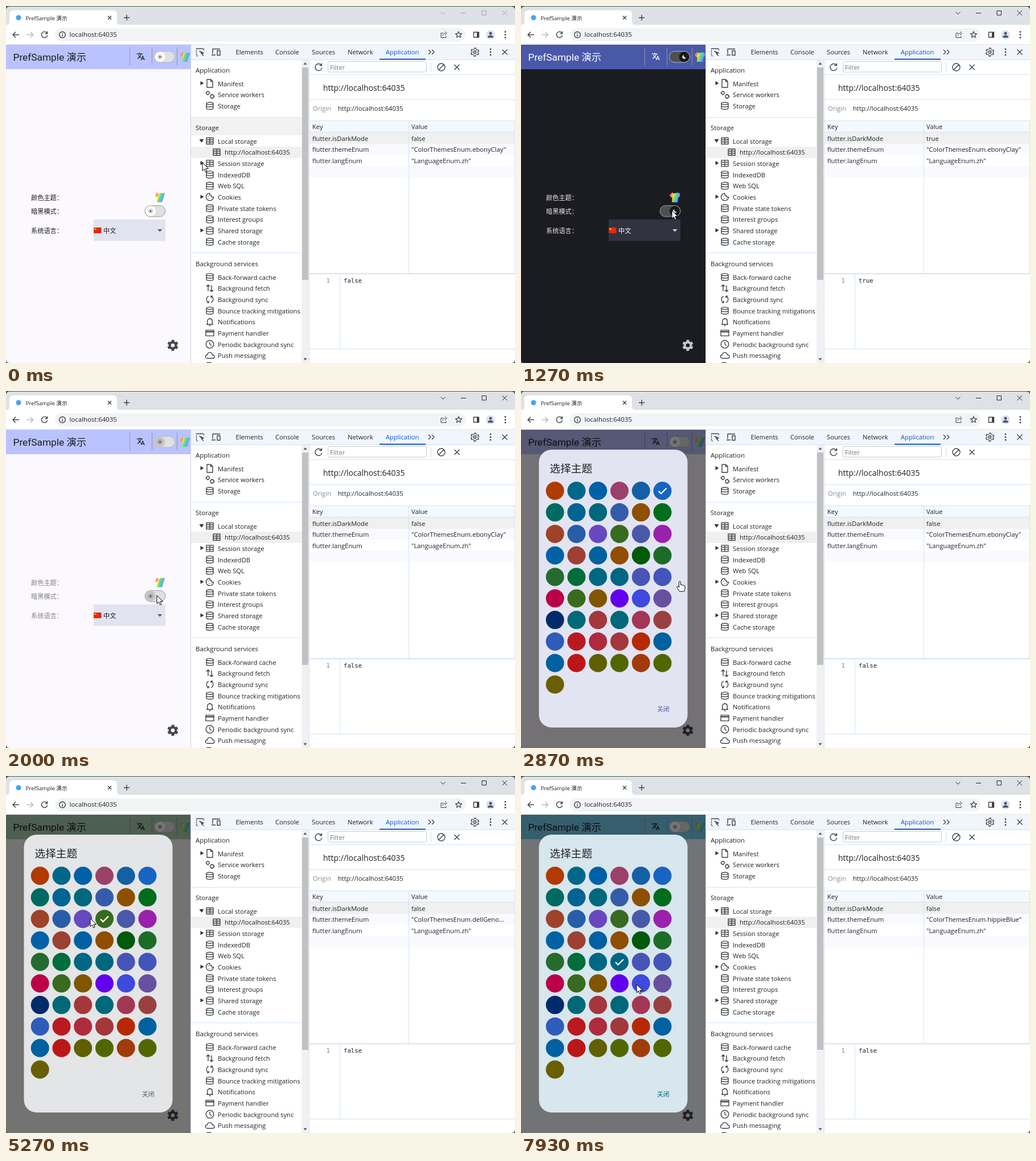
Animation, 894 px wide and 627 px high, one loop 8 s. Source, as an HTML page:

```html
<!DOCTYPE html>
<html lang="zh">
<head>
<meta charset="utf-8">
<title>PrefSample 演示</title>
<style>
html, body { margin: 0; width: 100%; height: 100%; overflow: hidden; background: #45604f; }
svg { display: block; width: 894px; height: 627px; }
text { font: 11.2px "Open Sans", "Noto Sans CJK SC", "Noto Sans CJK", sans-serif; fill: #202124; white-space: pre; }
.app text { font-family: Roboto, "Noto Sans CJK SC", "Noto Sans CJK", sans-serif; }
text.mono { font: 10.7px "DejaVu Sans Mono", monospace; }
.ico { fill: none; stroke: #3c4043; stroke-width: 1.4; stroke-linejoin: round; }
</style>
</head>
<body>
<svg id="stage" viewBox="0 0 894 627" xmlns="http://www.w3.org/2000/svg"></svg>
<script>
const LOOP = 8000;
const rect = (x, y, w, h, fill, more = '') =>
  `<rect x="${x}" y="${y}" width="${w}" height="${h}" fill="${fill}" ${more}/>`;
const text = (x, y, s, more = '') => `<text x="${x}" y="${y}" ${more}>${s}</text>`;
const size = (px, more = '') => `style="font-size:${px}px;${more}"`;
const icon = (x, y, d, more = '') => `<path class="ico" transform="translate(${x} ${y})" d="${d}" ${more}/>`;
const disc = (x, y, r, fill, more = '') => `<circle cx="${x}" cy="${y}" r="${r}" fill="${fill}" ${more}/>`;
const hline = (x, y, w, c = '#d3e3fd') => rect(x, y, w, 1, c);
const vline = (x, y, h, c = '#d3e3fd') => rect(x, y, 1, h, c);

const ring = r => `M${-r} 0a${r} ${r} 0 1 0 ${2 * r} 0a${r} ${r} 0 1 0 ${-2 * r} 0`;
const ICONS = {
  db: 'M-6 -4.2c0-2.6 12-2.6 12 0s-12 2.6-12 0V4.2c0 2.6 12 2.6 12 0V-4.2M-6 0c0 2.6 12 2.6 12 0',
  grid: 'M-6 -5.5H6V5.5H-6ZM-6 -2H6M-6 1.8H6M0 -5.5V5.5',
  file: 'M-5 -7H1.5L5 -3.5V7H-5ZM1.5 -7V-3.5H5',
  gears: 'M-6 -3a2.6 2.6 0 1 0 5.2 0a2.6 2.6 0 1 0-5.2 0M1 3a3 3 0 1 0 6 0a3 3 0 1 0-6 0M-3.4-7v1.4M-3.4-.4V1M-7.5-3h1.5M4-1.5V0M4 6v1.5M7 3h1.5',
  cookie: 'M0 -6.5A6.5 6.5 0 1 0 6.5 0C4 1 2.5-.5 3-2.5C.5-2-.8-4 0-6.5M-3-1.5h1.2M-2 3h1.2M2 2.5h1.2',
  updown: 'M-3 5V-6M-6 -3L-3 -6L0 -3M3 -5V6M0 3L3 6L6 3',
  sync: 'M-2 -5.5C-7 -4-7 4-2 5.5M-5 5.8H-2V2.5M2 5.5C7 4 7-4 2-5.5M5-5.8H2V-2.5',
  bell: 'M-6 4.5H6M-4.3 4.5V-1C-4.3-7 4.3-7 4.3-1V4.5M-1.5 6.8H1.5M0-7V-5',
  card: 'M-7 -5H7V5H-7ZM-7 -1.8H7M-7-2.6H7',
  clock: ring(6.8) + 'M0 -4V0L3 2.5',
  cloud: 'M-4 5C-9 5-8.5-1-4.5-1C-4-6.5 4-6.5 4.5-1C9.5-1 9 5 5 5Z'
};

// Six teeth come from one dashed circle.
function gear(x, y, s, color, id = '') {
  return `<g ${id} transform="translate(${x} ${y}) scale(${s})" fill="none" stroke="${color}">
    <circle r="5.2" stroke-width="4"/>
    <circle r="7.8" stroke-width="3" pathLength="12" stroke-dasharray="1.1 .9" transform="rotate(13.5)"/></g>`;
}

function sidebar() {
  // label, icon, marker (> closed, v open)
  const groups = [
    [136.5, ['Manifest,file,>', 'Service workers,gears', 'Storage,db']],
    [237.5, ['Local storage,grid,v', 'http://localhost:64035,grid,sub', 'Session storage,grid,>', 'IndexedDB,db', 'Web SQL,db',
      'Cookies,cookie,>', 'Private state tokens,db', 'Interest groups,db', 'Shared storage,db,>', 'Cache storage,db']],
    [476.5, ['Back-forward cache,db', 'Background fetch,updown', 'Background sync,sync', 'Bounce tracking mitigations,db',
      'Notifications,bell', 'Payment handler,card', 'Periodic background sync,clock', 'Push messaging,cloud', 'Reporting API,file']]
  ];
  let s = rect(325, 95, 194, 532, '#fff') + rect(325, 196, 194, 31, '#f2f2f2', 'id="heading"') +
    rect(325, 247, 194, 20, '#f0f0f0') + hline(325, 195, 194) + hline(325, 433, 194);
  [['Application', 117], ['Storage', 218], ['Background services', 457]].forEach(([h, y]) =>
    s += text(333, y, h, size(11.5, 'font-weight:500')));
  for (const [top, items] of groups) items.forEach((item, i) => {
    const [label, kind, mark] = item.split(','), y = top + i * 19.68, dx = mark === 'sub' ? 12 : 0;
    s += icon(358 + dx, y - .5, ICONS[kind]) + text(372 + dx, y + 4, label);
    if (mark === '>') s += `<path d="M341.500 ${y - 4.500}l6 3.500l-6 3.500z" fill="#333"/>`;
    if (mark === 'v') s += `<path d="M339.500 ${y - 3.500}h8l-4 6z" fill="#333"/>`;
  });
  return s + rect(519, 95, 13, 532, '#f1f1f1') + rect(520, 108, 11, 373, '#c1c1c1') +
    '<path d="M522.500 103h6l-3-4zM522.500 618.500h6l-3 4z" fill="#555"/>';
}

function devtools() {
  const head = '#f1f5fc';
  let s = rect(324, 68, 570, 559, '#fff') + rect(324, 68, 570, 27, head) + hline(324, 94, 570) + sidebar();
  s += icon(341, 81, 'M-6.500 5V-6H6M-6.500-6H6.500V-2M-6.500 6.500H-3', 'stroke-dasharray="2 1.300"') +
    icon(341, 81, 'M-1.500-1.500L6 1.500L2.500 3L1-1M2.500 3L6 6.500');
  s += icon(369, 81, 'M-6 3V-5.500H7M-8 5H-1M2-2.500H7V5.500H2Z');
  [['Elements', 403.5], ['Console', 473], ['Sources', 537], ['Network', 600]].forEach(([n, x]) => s += text(x, 85, n));
  s += text(667, 85, 'Application', 'style="fill:#0b57d0"') + rect(656, 92.500, 81, 2, '#0b57d0');
  s += icon(747, 81, 'M-5-4L-1 0L-5 4M1-4L5 0L1 4');
  s += gear(823.5, 81, .83, '#3c4043') + gear(823.5, 81, .64, head) + disc(823.5, 81, 4, head) +
    icon(823.5, 81, ring(2.2));
  [-5, 0, 5].forEach(d => s += disc(851, 81 + d, 1.4, '#3c4043'));
  s += icon(876, 81, 'M-4.500-4.500L4.500 4.500M4.500-4.500L-4.500 4.500');
  s += vline(532, 95, 532) + icon(549, 107.5, 'M5-3.500A6 6 0 1 0 6 1M5.500-7V-3H1.500') +
    rect(565.5, 97.5, 173, 18.5, '#fff', 'rx="3" stroke="#c7c9cc"') + text(569, 112, 'Filter', 'style="fill:#777"') +
    vline(746, 99, 17, '#d5dbe6') + icon(764.5, 107.5, ring(6.5) + 'M-4.500 4.500L4.500-4.500') +
    icon(792, 107.5, 'M-4.500-4.500L4.500 4.500M4.500-4.500L-4.500 4.500');
  s += hline(533, 120, 361) + text(557, 149, 'http://localhost:64035', size(14)) + hline(533, 164, 361);
  s += text(539, 184, 'Origin', 'style="fill:#80868b"') + text(583, 184, 'http://localhost:64035');
  s += rect(533, 201, 361, 20, '#f5f8fd') + rect(533, 222, 361, 20, '#f0f0f0') +
    rect(533, 242, 361, 19.5, '#f8fafe') + rect(533, 281, 361, 19.5, '#f8fafe') +
    hline(533, 201, 361) + hline(533, 221, 361) + vline(707, 201, 269) + vline(893, 201, 269) +
    rect(533, 469.5, 361, 1.5, '#cbdcf8');
  s += text(538, 215.5, 'Key') + text(712, 215.5, 'Value');
  ['isDarkMode', 'themeEnum', 'langEnum'].forEach((k, i) => s += text(538, 236.5 + i * 19.8, 'flutter.' + k));
  s += text(712, 236.5, '', 'id="darkValue"') + text(712, 256.3, '', 'id="themeValue"') +
    text(712, 276, '"LanguageEnum.zh"');
  s += vline(586, 471, 131) + hline(533, 602, 361) + text(562.5, 486, '1', 'class="mono" style="fill:#80868b"') +
    text(593, 486, '', 'class="mono" id="preview"');
  return s + vline(324, 68, 559, '#c9d3e6');
}

function browser() {
  let s = rect(0, 1, 894, 33, '#dee1e6') + rect(0, 33, 894, 35, '#fff') +
    '<path d="M0 33.500Q6 33.500 6 27V15Q6 7.500 13 7.500H188Q195 7.500 195 15V27Q195 33.500 201 33.500Z" fill="#fff"/>';
  s += disc(22, 20.5, 4.5, '#42a5f5') + text(34.5, 24.5, 'PrefSample 演示', size(9.6)) +
    icon(182, 20.5, 'M-3-3L3 3M3-3L-3 3') + icon(212, 20.5, 'M-5 0H5M0-5V5');
  s += `<g id="controls" class="ico" style="stroke-width:1"><path d="M763.500 10.500l4 4l4-4M799 12.500h9M836 8.500h7.500v7.500h-7.500zM871.500 8l8.500 8.500M880 8l-8.500 8.500"/></g>`;
  s += icon(17, 50.5, 'M6 0H-5M0-5L-5 0L0 5') + icon(42.5, 50.5, 'M-6 0H5M0-5L5 0L0 5', 'style="stroke:#b4b7bb"') +
    icon(67.5, 50.5, 'M4.500-3A5.200 5.200 0 1 0 5.200 1M5-6V-2H1');
  s += rect(86, 39, 721, 23, '#f1f3f4', 'rx="11.500"') + icon(99, 50.5, ring(5.3) + 'M0-.8V3M0-3V-1.800', 'stroke-width="1.200"') +
    text(111.5, 54.3, 'localhost:64035', size(11.4));
  s += icon(769, 50.5, 'M-1-3H-5V5H4V2M-2 2C-2-1 0-2.500 3-2.500M2-5.500L5.500-2.500L2 .5', 'style="stroke-width:1"');
  const star = Array.from({ length: 10 }, (_, i) => {
    const a = i * Math.PI / 5, r = i % 2 ? 2.6 : 5.8;
    return (r * Math.sin(a)).toFixed(1) + ' ' + (-r * Math.cos(a)).toFixed(1);
  }).join('L');
  s += icon(795, 50.5, `M${star}Z`, 'style="stroke-width:1.200"') + icon(826, 50.5, 'M-4.500-4.500H4.500V4.500H-4.500Z') + rect(827, 46, 4, 9, '#3c4043');
  s += disc(851, 50.5, 8, '#dfe4ef') + disc(851, 48, 2.5, '#46536b') + '<path d="M846 55.500q0-4 5-4t5 4z" fill="#46536b"/>';
  [-5, 0, 5].forEach(d => s += disc(877, 50.5 + d, 1.4, '#3c4043'));
  return s + hline(0, 67, 894, '#e3e5e8');
}

// The sleeves are too pale to see on a light page.
const shirt = (x, y) => `<g transform="translate(${x} ${y})" fill="url(#rainbow)">
  <path class="sleeves" d="M5 0Q9.500 4 14 0L19 4.500L16 9L14.500 8V17H4.500V8L3 9L0 4.500Z"/>
  <path d="M4 0L7 2.500L10 1H18L13 17H4L6 8L1 7Z"/></g>`;

const toggle = (x, y, border) => `<g transform="translate(${x} ${y})">
  <rect class="track" width="36" height="19.500" rx="9.750" stroke="${border}"/>
  <g class="knob"><circle r="9" cy="9.750"/>
  <g class="sun" stroke="#444"><circle r="1.600" cy="9.750" fill="#444" stroke="none"/>
  <circle r="3.300" cy="9.750" fill="none" stroke-width="1.200" pathLength="16" stroke-dasharray=".8 1.200"/></g>
  <path class="moon" d="M-.5 6.500a3.500 3.500 0 1 0 4 4.500a3.500 3.500 0 0 1-4-4.500z" fill="#ddd"/></g></g>`;

const TRANSLATE = 'M12.87 15.07l-2.54-2.51.03-.03c1.74-1.94 2.98-4.17 3.71-6.53H17V4h-7V2H8v2H1v2h11.17C11.5 7.92 10.44 9.75 9 11.35 8.07 10.32 7.3 9.19 6.69 8h-2c.73 1.63 1.73 3.17 2.98 4.56l-5.09 5.02L4 19l5-5 3.11 3.11zM18.5 10h-2L12 22h2l1.12-3h4.75L21 22h2zm-2.62 7l1.62-4.33L19.12 17z';

function app() {
  let s = rect(0, 68, 324, 559, '#fff', 'id="page"') + rect(0, 68, 324, 43, '#fff', 'id="bar"');
  s += text(12.5, 96, 'PrefSample 演示', `class="strong" ${size(17.3)}`) +
    `<path class="strong" transform="translate(229 81) scale(.64)" d="${TRANSLATE}"/>`;
  [217, 256, 300].forEach(x => s += vline(x, 73, 31, '#8f93ad'));
  s += toggle(260.5, 79.5, '#b4b4b8') + shirt(305, 81) + shirt(261, 327.5);
  [['颜色主题：', 340.5], ['暗黑模式：', 364.8], ['系统语言：', 398.5]].forEach(([l, y]) => s += text(44, y, l, 'class="label"'));
  s += toggle(244, 350.5, '#9c9c9c') + rect(154, 375, 126, 37.5, '#fff', 'id="drop"') + rect(154, 389, 13.5, 10, '#de2910') +
    disc(156.7, 391.8, 1.4, '#ffde00') + disc(160, 391, .6, '#ffde00') + disc(160.4, 393.5, .6, '#ffde00') +
    text(171, 398.5, '中文', 'class="strong"') + '<path id="caret" d="M266 392h8.500l-4.250 4.500z"/>';
  return s + gear(293, 596, 1.04, '#444', 'id="gear"');
}

const SWATCHES = ('b03a00 006788 0060a8 9b4069 1360a5 1765c0 006a62 006492 00687c 355ca8 8d5000 006d1c ' +
  '9f422a 285ea8 6748bf 386a1f 4a58a9 9a21ab 0061a4 9c4133 0061a0 914d00 005a0a 1c6c28 ' +
  '256b2f 006d3b 006783 006780 4855b6 4355b9 ba0048 386b1d 805600 6200ee 3e49e0 6750a0 ' +
  '002b6a 006876 a4373c 00687a a23755 9a4040 2f5cb9 b91a20 b02a3e a4373c b52a04 0061a0 ' +
  '0060a0 bb1718 606000 526600 a03c08 526600 6a5f00').split(' ');
const cell = (c, r) => [59.7 + c * 37.75, 175.3 + r * 37.8];

function dialog() {
  let s = `<g id="dialog">` + rect(31.5, 103, 261, 488, '#fff', 'id="sheet" rx="22"') + text(50.5, 142.5, '选择主题', size(18.7));
  SWATCHES.forEach((c, i) => s += disc(...cell(i % 6, Math.floor(i / 6)), 16, '#' + c));
  return s + '<path id="tick" d="M-7 .5L-2.500 5L7-4.500" fill="none" stroke="#fff" stroke-width="2.200"/>' +
    text(239, 563, '关闭', `id="close" ${size(10.8)}`) + '</g>';
}

document.getElementById('stage').innerHTML = `<defs>
  <linearGradient id="rainbow" x1="0" y1=".2" x2="1" y2=".55">
    ${['#ff6fae', '#ff8a5c', '#ffe23d', '#7be04a', '#35d5e8', '#7d8cf5', '#d67bf0'].map((c, i) => `<stop offset="${i / 6}" stop-color="${c}"/>`).join('')}
  </linearGradient>
  <clipPath id="window"><rect y="1" width="894" height="626" rx="6"/></clipPath>
  <clipPath id="pane"><rect y="68" width="324" height="559"/></clipPath></defs>
  <g clip-path="url(#window)">${browser()}
  <g class="app" clip-path="url(#pane)">${app()}${rect(0, 68, 324, 559, '#000', 'id="shade"')}${dialog()}</g>
  ${devtools()}</g>
  <g id="cursor" fill="#fff" stroke="#000" stroke-linejoin="round">
  <path id="arrow" d="M0 0V14.500L3.400 11.400L5.600 16.600L8 15.600L5.800 10.600H10.500Z"/>
  <path id="hand" d="M-1.500 1.500Q0-1 1.500 1.500V6.500Q3 5 4.300 7Q6 6 7 8Q9 7 9 9.500V13Q8.500 15 7.500 18H-.5L-5 11Q-5.500 8.500-3.500 9L-1.500 11Z"/></g>`;

const $ = id => document.getElementById(id);
const all = (sel, fn) => document.querySelectorAll(sel).forEach(fn);
const ramp = (t, start, len) => Math.min(1, Math.max(0, (t - start) / len));
const mix = (a, b, p) => '#' + [1, 3, 5].map(i => {
  const u = parseInt(a.substr(i, 2), 16), v = parseInt(b.substr(i, 2), 16);
  return Math.round(u + (v - u) * p).toString(16).padStart(2, '0');
}).join('');

// start time, app bar, page, dialog, accent
const THEMES = [
  [-999, '#bac3ff', '#fbf8fe', '#e3e4f2', '#4a58a9'],
  [900, '#4a58a9', '#1b1c21', '#31333e', '#bac3ff'],
  [1790, '#bac3ff', '#fbf8fe', '#e3e4f2', '#4a58a9'],
  [5100, '#a4d3a2', '#fcfdf5', '#e4e5e4', '#386a1f'],
  [5570, '#d2c0fc', '#fdf8fe', '#e9e3f5', '#6748bf'],
  [6400, '#74d6ea', '#fafcfd', '#d9e6ea', '#00687c'],
  [7580, '#76d0f0', '#fafcfe', '#d8e6ed', '#006780']
];
const DURATIONS = [0, 200, 200, 200, 450];
const NAMES = [[0, 'ebonyClay"'], [5190, 'dellGeno...'], [5660, 'deepPurp...'], [6460, 'cyanM3"'], [7660, 'hippieBlue"']];
const TICKS = [[0, 5, 0], [4325, 4, 2], [5125, 3, 2], [5590, 2, 2], [6390, 2, 1], [7590, 3, 4]];
const PATH = [[0, 345, 275], [867, 265, 359], [2130, 265, 359], [2470, 271, 336], [2670, 271, 336], [2870, 279, 334],
  [3470, 248, 285], [3600, 218, 238], [3870, 218, 238], [4130, 209, 246], [4330, 211, 251], [4500, 211, 251],
  [4930, 172, 250], [5130, 172, 250], [5270, 148, 250], [5530, 133, 247], [5670, 133, 247], [5930, 131, 206], [6470, 131, 206],
  [6800, 240, 537], [7100, 240, 537], [7330, 152, 300], [7400, 168, 322], [7600, 168, 322], [7930, 203, 366], [8000, 203, 366]];

const latest = (list, t) => list.filter(e => e[0] <= t).pop();

function pointer(t) {
  const i = Math.max(1, PATH.findIndex(p => p[0] >= t)), [t0, x0, y0] = PATH[i - 1], [t1, x1, y1] = PATH[i];
  const p = ramp(t, t0, t1 - t0), e = p * p * (3 - 2 * p);
  return [x0 + (x1 - x0) * e, y0 + (y1 - y0) * e];
}

function render(t) {
  const fill = (id, c) => $(id).setAttribute('fill', c);
  const [, bar, page, sheet, accent] = THEMES.reduce((a, b) =>
    b.map((c, i) => i ? mix(a[i], c, ramp(t, b[0], DURATIONS[i])) : c));
  const dark = len => ramp(t, 900, len) - ramp(t, 1790, len);
  const night = dark(200), slide = dark(180);
  const textNight = ramp(t, 900, 360) - ramp(t, 1800, 400);
  const strong = mix('#1b1b1f', '#ffffff', night);

  fill('bar', bar); fill('page', page); fill('sheet', sheet);
  fill('drop', mix('#e1e3ee', '#31333e', night));
  fill('caret', mix('#5d5e66', '#d0d0d6', night));
  $('gear').setAttribute('stroke', mix('#44464f', '#c6c6d0', night));
  $('close').style.fill = accent;
  all('.strong', e => e.style.fill = strong);
  all('.label', e => e.style.fill = mix('#1b1b1f', '#e8e6ea', textNight));
  all('.sleeves', e => e.setAttribute('opacity', night));
  all('.track', e => e.setAttribute('fill', mix('#e0e0e0', '#505050', night)));
  all('.knob', e => {
    e.setAttribute('transform', `translate(${10 + 16 * slide} 0)`);
    e.setAttribute('fill', mix('#ffffff', '#18181a', dark(280)));
  });
  all('.sun', e => e.setAttribute('opacity', 1 - slide));
  all('.moon', e => e.setAttribute('opacity', slide));

  const isDark = String(t >= 990 && t < 1860);
  $('darkValue').textContent = $('preview').textContent = isDark;
  $('themeValue').textContent = '"ColorThemesEnum.' + latest(NAMES, t)[1];

  $('shade').setAttribute('opacity', .54 * ramp(t, 2640, 200));
  $('dialog').setAttribute('opacity', ramp(t, 2640, 160));
  const [, col, row] = latest(TICKS, t);
  $('tick').setAttribute('transform', `translate(${cell(col, row)})`);

  // Until the first move the window is unfocused and the heading is lit.
  const idle = t < 60;
  $('controls').style.stroke = idle ? '#a0a3a8' : '#202124';
  fill('heading', idle ? '#f2f2f2' : '#ffffff');

  const hand = t > 2300 && t < 2930;
  $('cursor').setAttribute('transform', `translate(${pointer(t)})`);
  $('hand').style.display = hand ? '' : 'none';
  $('arrow').style.display = hand ? 'none' : '';
}

const STEP = 1000 / 15;
const began = performance.now();
function tick() {
  const t = (performance.now() - began) % LOOP;
  render(Math.floor(t / STEP + .06) * STEP);
  requestAnimationFrame(tick);
}
tick();
</script>
</body>
</html>
```
